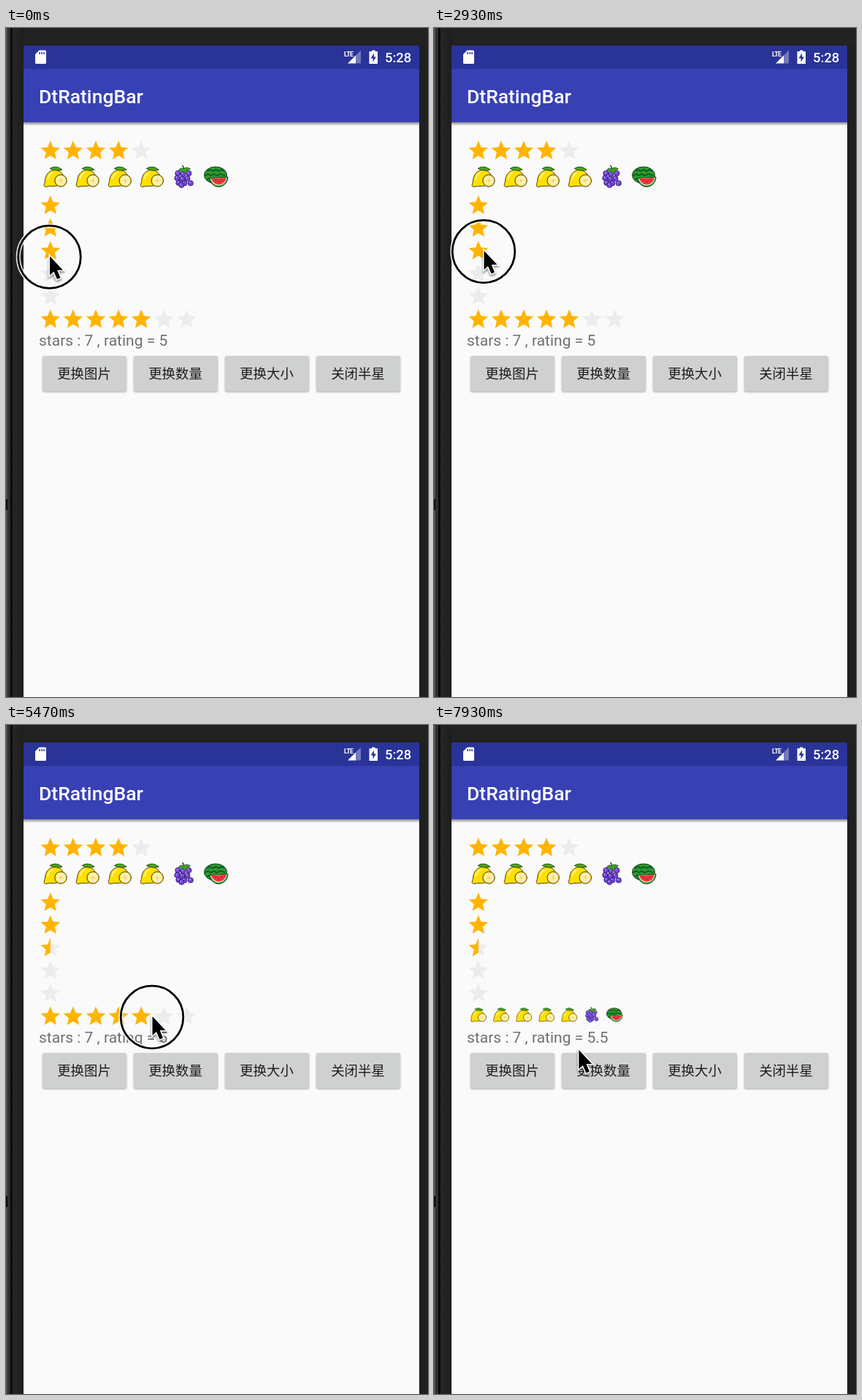
Recreate the animation shown at these times as an HTML page. Size 578 by 916 pixels, loop 8000 ms.

```html
<!DOCTYPE html>
<html lang="zh">
<head>
<meta charset="utf-8">
<title>DtRatingBar</title>
<style>
html, body { margin: 0; width: 100%; height: 100%; overflow: hidden; background: #232323; }
svg { display: block; width: 578px; height: 916px; font-family: Roboto, sans-serif; }
.full { fill: #ffb400; }
.empty { fill: #ececec; }
.button text { font: 18.4px "Noto Sans CJK SC", "Noto Sans CJK", sans-serif; fill: #1c1c1c; text-anchor: middle; }
.button rect { fill: #cfd1d0; filter: drop-shadow(0 1.3px 1px #0005); }
.button.pressed rect { fill: #b7b9b8; filter: drop-shadow(0 2.5px 2px #0006); }
</style>
</head>
<body>
<svg viewBox="0 0 578 916">
  <defs>
    <linearGradient id="edge">
      <stop stop-color="#5c5c5c"/><stop offset=".07" stop-color="#4a4a4a"/>
      <stop offset=".1" stop-color="#2e2e2e"/><stop offset=".22" stop-color="#343434"/>
      <stop offset=".27" stop-color="#060606"/><stop offset=".34" stop-color="#0c0c0c"/>
      <stop offset=".4" stop-color="#262626"/><stop offset="1" stop-color="#1d1d1d"/>
    </linearGradient>
    <linearGradient id="shade" x2="0" y2="1">
      <stop stop-color="#000" stop-opacity=".45"/><stop offset="1" stop-color="#000" stop-opacity="0"/>
    </linearGradient>
    <clipPath id="left"><path d="M0 0H12V24H0Z"/></clipPath>
    <path id="star" d="M12 17.27 18.18 21l-1.64-7.03L22 9.24l-7.19-.61L12 2 9.19 8.63 2 9.24l5.46 4.73L5.82 21z"/>
    <g id="star2"><use href="#star" class="full"/></g>
    <g id="star1"><use href="#star" class="empty"/><use href="#star" class="full" clip-path="url(#left)"/></g>
    <g id="star0"><use href="#star" class="empty"/></g>

    <g id="fruit2" stroke="#4d3c14" stroke-linejoin="round">
      <path d="M-14 13C-16 11.500-14 9-13.500 5C-13-3-8-9-1-9.500C6-10 12-5 12 2C12 9 5 13-4 12.500C-9 12-12 14.500-14 13Z" fill="#ffe000"/>
      <path d="M-10 3Q-8-4-3-6" fill="none" stroke="#fff7a8" stroke-width="1.400"/>
      <path d="M-7-11.500Q1-17 10-10Q3-7-7-11.500Z" fill="#4fa31e" stroke="#27550f"/>
      <circle cx="8" cy="5" r="8.200" fill="#ffdf3c"/>
      <circle cx="8" cy="5" r="6.500" fill="#fff9da" stroke="none"/>
      <path d="M8-1V11M2 5H14M3.800.8L12.200 9.200M12.200.8L3.800 9.200" stroke="#ffc92e" stroke-width=".8"/>
    </g>
    <g id="fruit1">
      <path d="M0-9Q1-13-2-16" fill="none" stroke="#62401f" stroke-width="1.600"/>
      <g id="berries" fill="#7647dc" stroke="#2c1a6c" stroke-width=".9"></g>
      <path d="M-7-9Q-4-14 0-11Q4-15 9-11Q5-9 2-5Q0-8-7-9Z" fill="#3e9d2e" stroke="#1e521c" stroke-width=".8"/>
    </g>
    <g id="fruit0" stroke-linejoin="round">
      <ellipse cx="-.5" cy="-2.500" rx="15.500" ry="11.500" fill="#2b9a30" stroke="#153d18"/>
      <path d="M-12-8l4-2 4 2 4-2 4 2 4-2 4 2M-15-2l4-2 4 2 4-2 4 2 5-2 7 2M-13 4l4-2 3 2" fill="none" stroke="#0f5222" stroke-width="1.800"/>
      <path d="M-9 1.500L16.500 0C16 8 11 13 4 13.500C-3 13.500-8 8-9 1.500Z" fill="#3fae42" stroke="#153d18"/>
      <path d="M-7.500 2L15 .8C14 7 10 11 4 11.500C-2 11.500-6 7-7.500 2Z" fill="#f7f4d8"/>
      <path d="M-6.500 2L14.200 1C13 6.500 9.500 10 4 10.500C-1 10.500-5 6.500-6.500 2Z" fill="#ef3340"/>
      <path d="M0 4v1M4 6v1M8 3.500v1" stroke="#4a1515" stroke-width="1.300"/>
    </g>
  </defs>

  <path d="M0 0H578V916H0Z" fill="#202020"/>
  <path d="M0 0H24V916H0Z" fill="url(#edge)"/>
  <path d="M24 0H578V24H24Z" fill="#222"/>
  <path d="M0 645H2V660H0Z" fill="#0c0c0c"/>
  <path d="M24 24H566V916H24Z" fill="#fafafa"/>
  <path d="M24 129H566V134H24Z" fill="url(#shade)"/>
  <path d="M24 56H566V129H24Z" fill="#3741b4"/>
  <path d="M24 24H566V56H24Z" fill="#2a3398"/>

  <g fill="#fff">
    <path d="M45.500 30.500H53.500Q55 30.500 55 32V47.500Q55 49 53.500 49H41.500Q40 49 40 47.500V36Z"/>
    <path d="M46 33v3M49 33v3M52 33v3" stroke="#2a3398" stroke-width="1.500"/>
    <text x="463" y="39" font-size="9" font-weight="700" letter-spacing="-.8">LTE</text>
    <path d="M468 48.500L479 37.500V48.500Z"/>
    <path d="M479 37.500L486 30.500V48.500H479Z" opacity=".35"/>
    <path d="M501 30.500H505.500V32H509V49H497.500V32H501Z"/>
    <path d="M504 34.500L499.500 41.500H502.500V46.500L507 39.500H504Z" fill="#2a3398"/>
    <text x="519" y="47" font-size="18.4" font-weight="500">5:28</text>
    <text x="45" y="103" font-size="26.5" font-weight="500">DtRatingBar</text>
  </g>

  <g id="bars"></g>
  <g id="column"></g>
  <g id="row"></g>
  <text id="label" x="45" y="435" font-size="21" fill="#707070"></text>
  <g id="buttons"></g>

  <g id="cursor">
    <g id="ring" fill="none">
      <circle cy="1" r="42.800" stroke="#fff" stroke-opacity=".85" stroke-width="6"/>
      <circle cy="1" r="42.800" stroke="#000" stroke-width="2.800"/>
    </g>
    <path d="M.5 0V26L6 21L10.500 31.500L15 29.500L10.700 19H18.500Z" stroke="#fff" stroke-width="3.200" paint-order="stroke" style="filter:drop-shadow(0 2px 1.500px #0007)"/>
  </g>
</svg>
<script>
const $ = id => document.getElementById(id);
const LOOP = 8000, STEP = 200 / 3, CELL = 31.1;

// level: 2 full, 1 half, 0 empty
const levels = (count, rating) =>
  Array.from({ length: count }, (_, i) => Math.max(0, Math.min(2, (rating - i) * 2)));
const star = (level, x, y) =>
  `<use href="#star${level}" transform="translate(${x} ${y}) scale(1.33) translate(-12 -11.5)"/>`;
const fruit = (level, x, y, scale = 1) =>
  `<use href="#fruit${level}" transform="translate(${x} ${y}) scale(${scale})"/>`;

const berries = [[-8, -5], [7, -5], [-1, -4], [-9, 1.5], [5, 2], [-2, 2.5], [-7, 8], [1, 8.5], [-3, 11], [9.5, 8.5]];
$('berries').innerHTML = berries.map(([x, y]) =>
  `<circle cx="${x}" cy="${y}" r="3.6"/><circle cx="${x - 1}" cy="${y - 1.2}" r=".9" fill="#c7a8ff" stroke="none"/>`).join('');

$('bars').innerHTML =
  levels(5, 4).map((v, i) => star(v, 60.8 + i * CELL, 167)).join('') +
  levels(6, 4.5).map((v, i) => fruit(v, 67 + i * 44.1, 204)).join('');

$('buttons').innerHTML = ['更换图片', '更换数量', '更换大小', '关闭半星'].map((name, i) =>
  `<g class="button" transform="translate(${50 + i * 125} 449)">
    <rect width="115" height="48.5" rx="2.5"/><text x="57" y="31">${name}</text></g>`).join('');
const firstButton = $('buttons').firstElementChild;

// time, x, y of the pointer tip
const path = [
  [0, 59.5, 312.5], [450, 58, 318], [1270, 62, 365], [1800, 62, 352], [2300, 63, 325],
  [2700, 65, 310], [2930, 68, 305], [3150, 68, 299], [3400, 70, 300], [3900, 150, 410],
  [4250, 146, 404], [4600, 136, 401], [5000, 170, 401], [5470, 200, 399], [5750, 210, 401],
  [6400, 114, 449], [6850, 113, 454], [7150, 113, 456], [7550, 140, 452], [8000, 201.5, 444.5]
];
const pressed = [[0, 3400], [4130, 5800], [6880, 7100]];
const columnRating = [[0, 3], [3060, 2.5]];
const rowRating = [[0, 5], [4130, 3.5], [4800, 4], [4980, 4.5], [5200, 5], [5600, 5.5]];

const valueAt = (list, t) => list.filter(([start]) => start <= t).pop()[1];

function pointerAt(t) {
  const i = Math.max(1, path.findIndex(([time]) => time > t));
  const [t0, x0, y0] = path[i - 1], [t1, x1, y1] = path[i];
  const p = (t - t0) / (t1 - t0), e = p * p * (3 - 2 * p);
  return [x0 + (x1 - x0) * e, y0 + (y1 - y0) * e];
}

let shown = '';
function drawRatings(column, row, fruits) {
  const key = [column, row, fruits].join();
  if (key === shown) return;
  shown = key;
  $('column').innerHTML = levels(5, column).map((v, i) => star(v, 60.8, 242 + i * CELL)).join('');
  $('row').innerHTML = levels(7, row).map((v, i) => fruits
    ? fruit(v, 60.5 + i * CELL, 397, .68)
    : star(v, 60.8 + i * CELL, 398)).join('');
  $('label').textContent = `stars : 7 , rating = ${row}`;
}

function draw(now) {
  const t = Math.floor((now % LOOP + 4) / STEP) * STEP % LOOP;
  const [x, y] = pointerAt(t);
  const down = pressed.some(([from, to]) => t >= from && t < to);
  $('cursor').setAttribute('transform', `translate(${x.toFixed(1)} ${y.toFixed(1)})`);
  $('ring').setAttribute('visibility', down ? 'visible' : 'hidden');
  firstButton.classList.toggle('pressed', down && t > 6500);
  drawRatings(valueAt(columnRating, t), valueAt(rowRating, t), t >= 7100);
}

let start;
function tick(now) {
  start ??= now;
  draw(now - start);
  requestAnimationFrame(tick);
}
draw(0);
requestAnimationFrame(tick);
</script>
</body>
</html>
```
